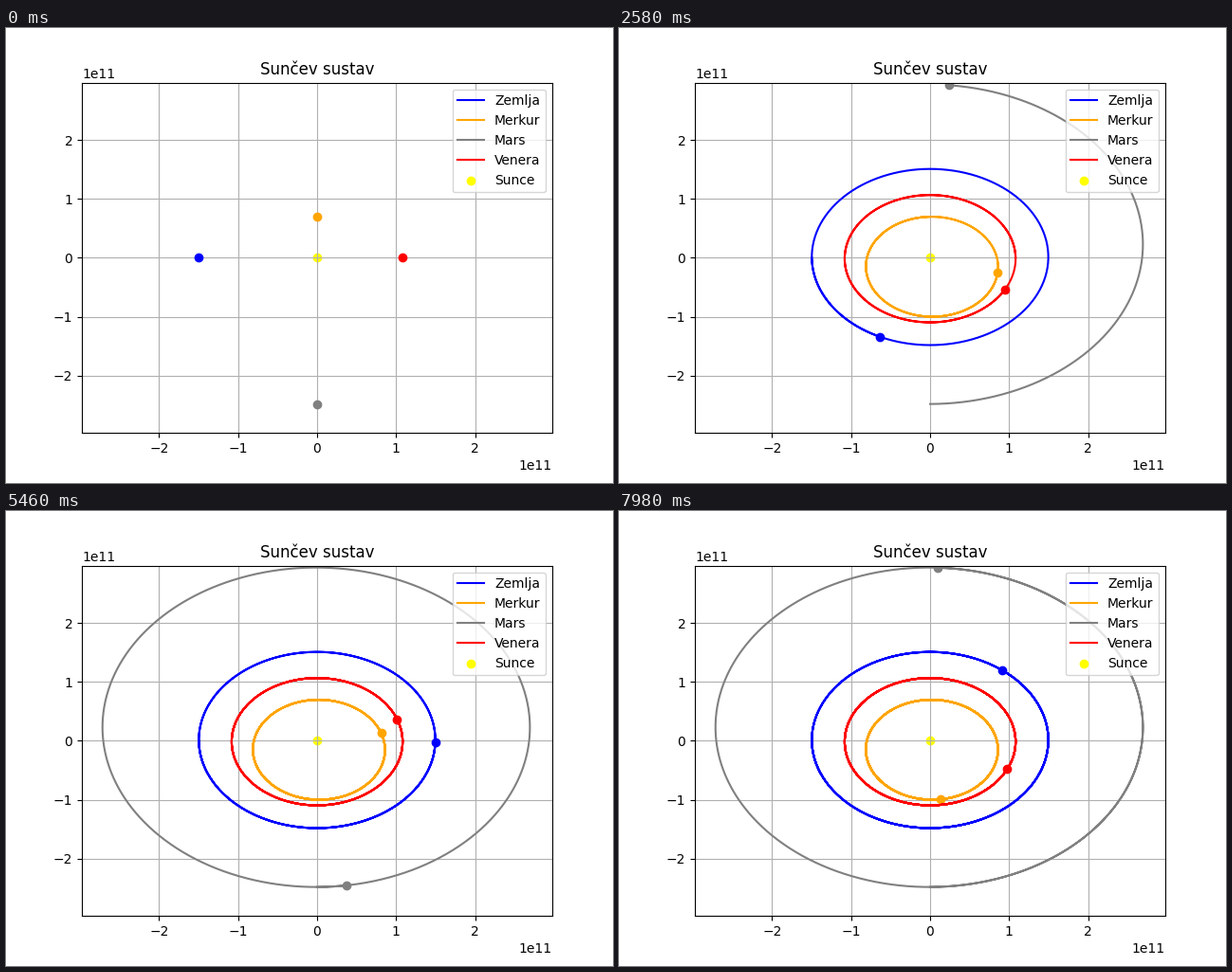
Animation of 640x480 px, one loop 8 s. Source, as a matplotlib script:

```python
import numpy as np
import matplotlib.pyplot as plt
from matplotlib.animation import FuncAnimation

AU = 1.496e11
GM = 1.3274e20            # sun, m^3/s^2
DAY = 86400.0
DAYS_PER_STEP = 10
STEP_MS = 60
TICK_MS = 40
LOOP_MS = 8000
STEPS = LOOP_MS // STEP_MS + 1
LIM = 2.975e11

# name, colour, start position, start velocity
PLANETS = [
    ("Zemlja", "blue", (-AU, 0), (0, -29783)),
    ("Merkur", "orange", (0, 0.466 * AU), (-47360, 0)),
    ("Mars", "gray", (0, -1.66 * AU), (24077, 0)),
    ("Venera", "red", (0.723 * AU, 0), (0, 35020)),
]


def orbit(pos, vel, days):
    """Daily positions, velocity updated before position."""
    p, v = np.array(pos, float), np.array(vel, float)
    path = np.empty((days + 1, 2))
    path[0] = p
    for i in range(1, days + 1):
        v = v - GM * p / np.hypot(*p) ** 3 * DAY
        p = p + v * DAY
        path[i] = p
    return path


fig, ax = plt.subplots(figsize=(6.4, 4.8), dpi=100)
ax.set_title("Sunčev sustav")
ax.set_xlim(-LIM, LIM)
ax.set_ylim(-LIM, LIM)
ax.grid(True)

bodies = []
for name, color, pos, vel in PLANETS:
    path = orbit(pos, vel, (STEPS - 1) * DAYS_PER_STEP)
    trail, = ax.plot([], [], color=color, label=name)
    dot, = ax.plot([], [], "o", color=color)
    bodies.append((path, trail, dot))
ax.scatter([0], [0], color="yellow", label="Sunce")
ax.legend(loc="upper right")


def draw(tick):
    step = (tick * TICK_MS + TICK_MS // 2) // STEP_MS
    day = min(step, STEPS - 1) * DAYS_PER_STEP
    for path, trail, dot in bodies:
        trail.set_data(path[:day + 1, 0], path[:day + 1, 1])
        dot.set_data(path[day:day + 1, 0], path[day:day + 1, 1])
    return [artist for body in bodies for artist in body[1:]]


anim = FuncAnimation(fig, draw, frames=LOOP_MS // TICK_MS, interval=TICK_MS,
                     init_func=lambda: draw(0), repeat=True, repeat_delay=0)
plt.show()
```
